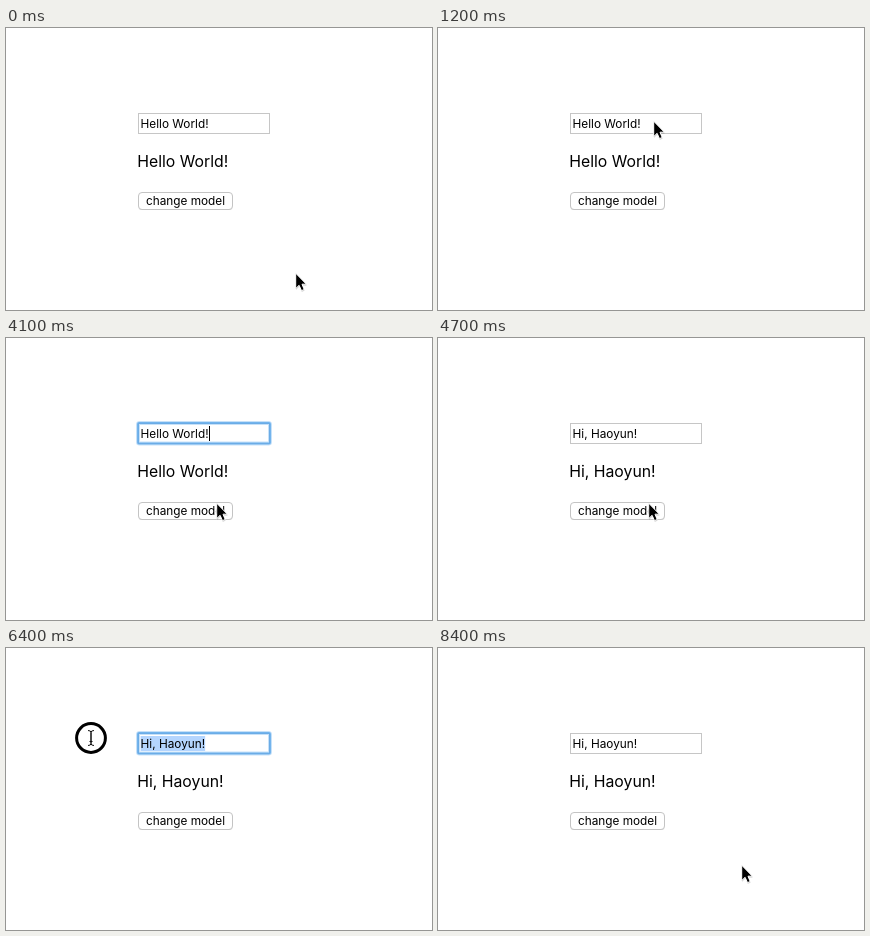
Write an HTML page that moves like this. It is 426 px wide and 282 px high and loops after 8.5 s.

```html
<!DOCTYPE html>
<html lang="en">
<head>
<meta charset="utf-8">
<title>Two-way binding demo</title>
<style>
  html, body { margin: 0; width: 100%; height: 100%; overflow: hidden; background: #fff; }
  svg { display: block; width: 100%; height: 100%; }
  text { font-family: Inter, "Liberation Sans", sans-serif; font-size: 11.8px; fill: #000; }
  #heading { font-size: 15.8px; }
</style>
</head>
<body>
<svg viewBox="0 0 426 282">
  <rect id="box" x="132.5" y="85.5" width="131" height="20" fill="#fff" stroke="#c6c6c6"/>
  <g id="focus" fill="none" stroke="#5ea9ec">
    <rect x="132" y="85" width="132" height="20.5" rx="1.5" stroke-width="4" opacity=".35"/>
    <rect x="132" y="85" width="132" height="20.5" rx="1" stroke-width="2" opacity=".8"/>
  </g>
  <rect id="selection" y="88" height="15" fill="#b4d5fe"/>
  <text id="field" x="134.6" y="100"></text>
  <rect id="caret" y="88" width="1" height="15"/>
  <text id="heading" x="131.2" y="139"></text>
  <rect x="132.5" y="165" width="94" height="17" rx="3.5" fill="#ccc"/>
  <rect x="132.5" y="164.5" width="94" height="17" rx="3.5" fill="#fff" stroke="#c4c4c4"/>
  <text x="179.5" y="177" text-anchor="middle">change model</text>
  <g id="arrow">
    <path id="tip" d="M.7 .2V15.6L4.1 12.3L6.5 17.6L9.2 16.5L7 11.2H11.4Z" opacity=".22" transform="translate(.3 1.2)"/>
    <use href="#tip" opacity="0"/>
    <path d="M.7 .2V15.6L4.1 12.3L6.5 17.6L9.2 16.5L7 11.2H11.4Z" stroke="#fff" stroke-linejoin="round"/>
  </g>
  <path id="beam" d="M-3 -7.5Q0 -7.5 0 -5.5V5.5Q0 7.5 -3 7.5M3 -7.5Q0 -7.5 0 -5.5V5.5Q0 7.5 3 7.5M-1.5 3.5H1.5" fill="none" stroke="#111"/>
  <circle id="ring" r="14.4" fill="none" stroke="#000" stroke-width="3"/>
</svg>
<script>
const LOOP = 8500, STEP = 100, LEFT = 134.6;
const HELLO = "Hello World!", HI = "Hi, Haoyun!", TYPED = "sasasa";
const BLINK = 500, DRAG = 6000, TYPE = 6500, TYPE_END = 7000;
const $ = id => document.getElementById(id);

// Each session: press on the field, later press on the button.
const sessions = [{ field: 1900, button: 4500 }, { field: 5400, button: 7500 }];

// Pointer moves: start, end, x, y, sideways bow
const START = [289, 245];
const moves = [
  [100, 1000, 215, 93, 0],
  [1200, 1600, 218, 93, -20],
  [3600, 4100, 210, 165, 25],
  [4700, 5300, 219, 96, 6],
  [5900, 6400, 85, 90, 0],
  [6900, 7400, 187, 169, 20],
  [7700, 8400, 303, 217, 0]
];

const within = (t, from, to) => t >= from && t < to;
const show = (el, on) => { el.style.display = on ? "" : "none"; };
const place = (el, x, y) => el.setAttribute("transform", `translate(${x} ${y})`);
const ease = k => k * k * (3 - 2 * k);

function pointer(t) {
  let [x, y] = START;
  for (const [from, to, endX, endY, bow] of moves) {
    if (t <= from) break;
    const k = ease(Math.min(1, (t - from) / (to - from)));
    x += (endX - x) * k + bow * Math.sin(Math.PI * k);
    y += (endY - y) * k;
  }
  return [x, y];
}

function textAt(t) {
  const typing = within(t, TYPE, sessions[1].button + 200);
  if (typing) return TYPED.slice(0, 1 + (t - TYPE) / STEP);
  return t < sessions[0].button + 200 ? HELLO : HI;
}

function caretOn(t, session) {
  const since = t >= TYPE_END ? TYPE_END : session.field + STEP;
  return Math.floor((t - since) / BLINK) % 2 === 0;
}

function draw(now) {
  const t = Math.floor((now % LOOP) / STEP) * STEP;
  const [x, y] = pointer(t);
  const active = sessions.find(s => within(t, s.field + STEP, s.button));
  const dragging = within(t, DRAG, TYPE);
  const pressed = dragging || sessions.some(s =>
    within(t, s.field, s.field + STEP) || within(t, s.button, s.button + 200));

  $("field").textContent = $("heading").textContent = textAt(t);
  const end = LEFT + $("field").getComputedTextLength();

  show($("focus"), active);
  show($("caret"), active && caretOn(t, active));
  $("caret").setAttribute("x", Math.round(end + 0.7));

  const from = Math.min(end, Math.max(LEFT, x));
  show($("selection"), dragging);
  $("selection").setAttribute("x", from);
  $("selection").setAttribute("width", end - from);

  const hidden = within(t, TYPE, TYPE_END);
  const overField = t >= 1800 && within(x, 132, 264) && within(y, 85, 106);
  const beam = dragging || overField;
  show($("beam"), beam && !hidden);
  show($("arrow"), !beam && !hidden);
  show($("ring"), pressed);
  place($("beam"), x, y);
  place($("arrow"), x, y);
  place($("ring"), beam ? x : x + 5, beam ? y : y + 8.5);
}

const start = performance.now();
function tick() {
  draw(performance.now() - start);
  requestAnimationFrame(tick);
}
tick();
</script>
</body>
</html>
```
